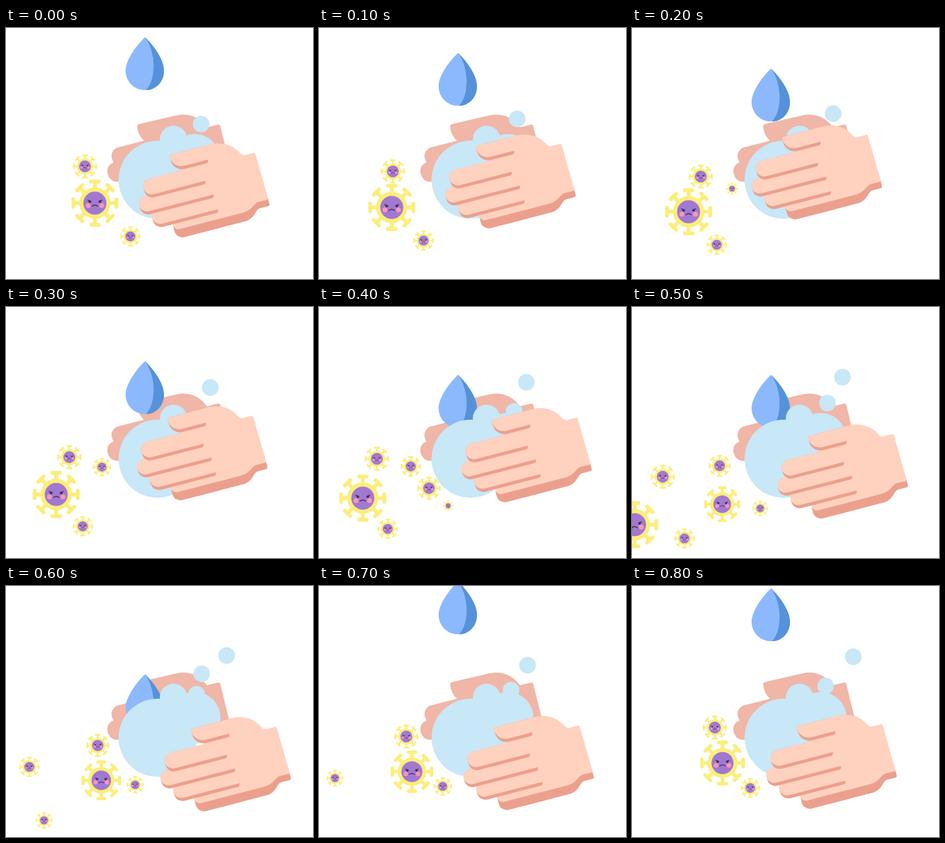
Write an HTML page with a canvas that moves like this. It is 480 px wide and 392 px high and loops after 0.9 s.

```html
<!DOCTYPE html>
<html lang="en">
<head>
<meta charset="utf-8">
<title>Hand washing</title>
<style>
  html, body { margin: 0; width: 100%; height: 100%; overflow: hidden; background: #fff; }
  canvas { display: block; }
</style>
</head>
<body>
<canvas id="stage" width="480" height="392"></canvas>
<script>
const ctx = document.getElementById('stage').getContext('2d');
const STEP = 100, STEPS = 9;
const SKIN = '#ffd2bf', SHADE = '#eba08d', BACK = '#f0b6a7', FOAM = '#c8e7f7';
const YELLOW = '#fbee7c', PURPLE = '#a179d0', INK = '#43305c', PINK = '#f994bf';

// Keys are [step, ...values]; lives longer than one loop overlap the next one.
const handKeys = [[0, 0, 0], [2, -21, -28], [4, 14.5, -22], [5, 19.5, 3.5], [6, 33.5, 25], [8, 2, 21], [9, 0, 0]];
const dropKeys = [[0, 14.5], [2, 63.5], [4, 106], [5, 106], [6, 138], [7, -7], [9, 14.5]];
const bubbles = [
  [[6, 298, 169], [9, 305, 150], [14, 329, 109.5], [15, 345, 108.5]],
  [[4, 305, 163], [6, 306, 137], [8, 346, 110.5]]
];

// All viruses turn at the same steps.
const TURNS = [4, 5, 6, 8, 9, 11, 13, 14, 15];
const route = points => points.map((p, i) => [TURNS[i], ...p]);
const viruses = [
  { size: 19, born: 2, gone: 16, keys: route([[143.5, 249], [137, 248], [143.5, 249], [129.5, 221],
    [123.5, 216], [107.5, 232], [90.5, 237], [48, 265], [36.5, 282.5]]) },
  { size: 37, born: 4, gone: 14, keys: route([[172, 283], [141, 308], [149, 303.5], [141.5, 276.5],
    [139, 273.5], [88.5, 287], [68.5, 298.5], [4, 340]]) },
  { size: 16, born: 4, gone: 15, keys: route([[202, 310.5], [200.5, 314.5], [202, 310.5], [185, 315.5],
    [194.5, 325.5], [132.5, 338.5], [107.5, 346.5], [82, 361.5], [59.5, 366]]) }
];

const backHand = new Path2D('M205 153Q205 151 208 150L264 137C284 132 302 138 314 155L331 151Q334 150 335 153L349 210L250 240L178 240Q163 242 159 228Q156 215 168 210Q160 195 173 187L216 176Q206 168 205 153Z');
const dropShape = new Path2D('M217.5 0C229 11 247.5 34 247 52.5A30 30 0 0 1 187 52.5C187 34 207 9 217.5 0Z');
const dropSide = new Path2D('M217.5 0C229 11 247.5 34 247 52.5C247 69 235 82.5 219 82.5C235 66 235 24 217.5 0Z');
const palm = (wrist, base) => new Path2D(
  `M212 256H262C284 256 298 267 305 281Q308 287 313 286H325Q328 286 328 289L330 ${wrist - 3}Q330 ${wrist} 327 ${wrist}H314C306 ${wrist} 303 ${base} 286 ${base}H212Z`);
const palmLight = palm(362, 372), palmShade = palm(372, 386);

// Straight motion between keys, continued past both ends
function sample(keys, step) {
  const found = keys.findIndex((k, i) => i > 0 && k[0] >= step);
  const next = found < 0 ? keys.length - 1 : found;
  const [t0, ...a] = keys[next - 1], [t1, ...b] = keys[next];
  const p = (step - t0) / (t1 - t0);
  return a.map((v, i) => v + (b[i] - v) * p);
}

function whileAlive(born, gone, step, draw) {
  for (const s of [step, step + STEPS])
    if (s >= born && s <= gone) draw(s);
}

function fill(path, color) {
  ctx.fillStyle = color;
  ctx.fill(path);
}

function disc(x, y, r, color) {
  const path = new Path2D();
  path.arc(x, y, r, 0, Math.PI * 2);
  fill(path, color);
}

function block(x, y, w, h, corners, color) {
  const path = new Path2D();
  path.roundRect(x, y, w, h, corners);
  fill(path, color);
}

function stroke(d, width, color) {
  ctx.lineWidth = width;
  ctx.strokeStyle = color;
  ctx.stroke(new Path2D(d));
}

function at(x, y, draw) {
  ctx.save();
  ctx.translate(x, y);
  draw();
  ctx.restore();
}

function finger(tip, top, end, height, shade = 5, upper = 12, lower = 13) {
  block(tip, top, end - tip, height, [upper, 0, 4, lower], SHADE);
  block(tip, top, end - tip + 15, height - shade, [upper, 0, 0, lower], SKIN);
}

function frontHand(x, y) {
  at(x, y, () => {
    ctx.rotate(-14.5 * Math.PI / 180);
    fill(palmShade, SHADE);
    fill(palmLight, SKIN);
    finger(175.5, 355, 250, 31, 14);
    finger(147, 332, 250, 30);
    finger(132.5, 309, 249, 29);
    finger(145.5, 284, 242, 30);
    finger(197.5, 256, 254, 27, 5, 2, 18);
  });
}

function drop(y) {
  at(0, y, () => {
    fill(dropShape, '#8cb9fd');
    fill(dropSide, '#5692d9');
  });
}

function virus(x, y, radius) {
  at(x, y, () => {
    ctx.scale(radius / 37, radius / 37);
    ctx.lineCap = 'round';
    for (let i = 0; i < 8; i++) {
      stroke('M0 -22V-33M-6 -33.7H6', 6, YELLOW);
      ctx.rotate(Math.PI / 4);
    }
    disc(0, 0, 24.5, YELLOW);
    disc(0, 0, 18, PURPLE);
    for (const side of [-1, 1]) {
      disc(side * 10.5, 3.7, 3.9, PINK);
      disc(side * 8, -2, 2, INK);
      stroke(`M${side * 11} -4.5L${side * 6} -2.8`, 1.4, INK);
    }
    stroke('M-4.5 4.8Q0 1.2 4.5 4.8', 1.4, INK);
  });
}

// Grows quickly at first, then shrinks a little on the way out
function virusRadius(size, age, step) {
  return size * (0.5 + 0.5 * Math.min(1, age / 5) ** 0.4) - 3 * Math.max(0, step - 14);
}

function render(step) {
  ctx.clearRect(0, 0, 480, 392);
  fill(backHand, BACK);
  drop(...sample(dropKeys, step));
  disc(237, 237, 61, FOAM);
  disc(262, 174, 21.5, FOAM);
  disc(295, 206, 40.5, FOAM);
  for (const keys of bubbles)
    whileAlive(keys[0][0], keys.at(-1)[0], step, s => disc(...sample(keys, s), 13, FOAM));
  frontHand(...sample(handKeys, step));
  for (const { size, born, gone, keys } of viruses)
    whileAlive(born, gone, step, s => virus(...sample(keys, s), virusRadius(size, s - born, s)));
}

function tick() {
  render(Math.floor(performance.now() / STEP) % STEPS);
  requestAnimationFrame(tick);
}
tick();
</script>
</body>
</html>
```
